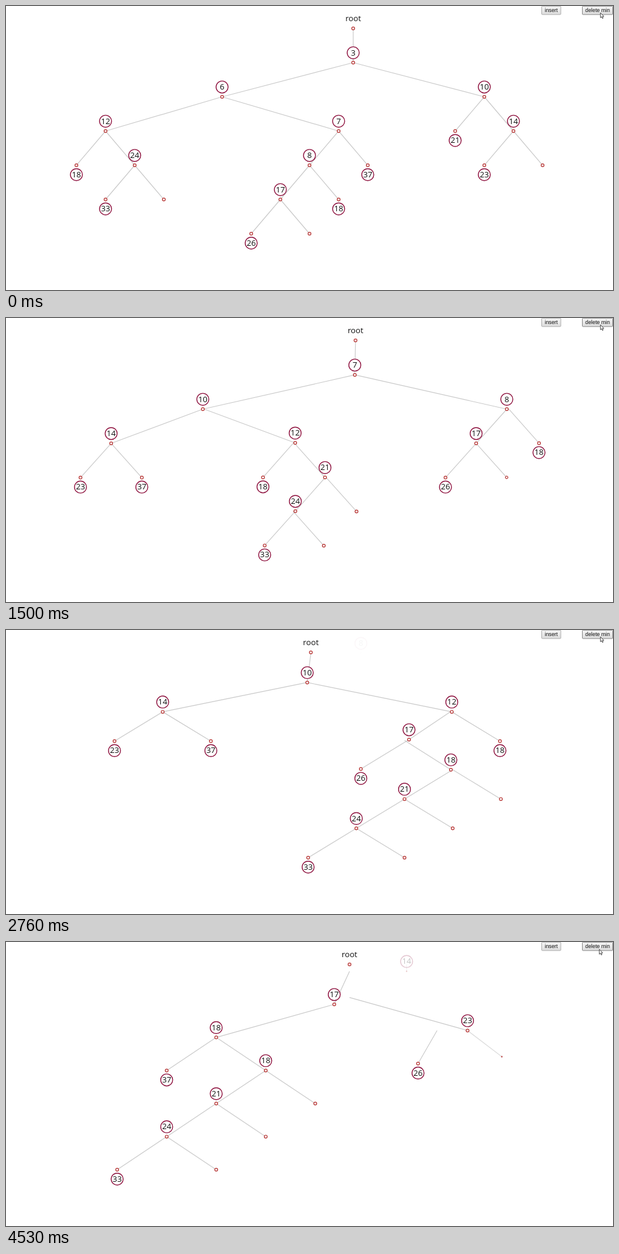
Recreate the animation shown at these times as an HTML page. Size 1000x469 px, loop 4.56 s.

```html
<!DOCTYPE html>
<html lang="en">
<head>
<meta charset="utf-8">
<title>Leftist heap</title>
<style>
  html, body { margin: 0; width: 100%; height: 100%; overflow: hidden; background: #fff; }
  svg { display: block; width: 100vw; height: 100vh; }
  .link { stroke: #cacaca; stroke-width: 1.2; }
  .dot { fill: #fff; stroke: #b5302f; stroke-width: 1.2; }
  .ring { fill: #fff; stroke: #8f1440; stroke-width: 1.4; }
  #tree text { font: 13.2px "Open Sans", "Noto Sans", sans-serif; fill: #111; text-anchor: middle; }
  .button text { font: 8.8px "Liberation Sans", Arial, sans-serif; fill: #111; text-anchor: middle; }
</style>
</head>
<body>
<svg viewBox="0 0 1000 469">
  <defs>
    <linearGradient id="face" x2="0" y2="1">
      <stop offset="0" stop-color="#f6f6f6"/>
      <stop offset="1" stop-color="#dcdcdc"/>
    </linearGradient>
  </defs>
  <g id="tree"></g>
  <g class="button">
    <rect x="882.5" y="0.3" width="31.5" height="13.8" rx="1" fill="url(#face)" stroke="#ababab"/>
    <text x="898.2" y="10.3">insert</text>
  </g>
  <g class="button">
    <rect id="press" x="949.5" y="0.3" width="50" height="13.8" rx="1" fill="url(#face)" stroke="#858585"/>
    <text x="974.6" y="10.3">delete min</text>
  </g>
  <path id="cursor" d="M0 0V8.2L1.9 6.5L3.2 9.4L4.5 8.8L3.2 6H5.7Z" fill="#fff" stroke="#222" stroke-width="0.8"/>
</svg>
<script>
const LOOP = 4560, MOVE = 670, FIRST_MOVE = 840, PRESS = 60;
const CLICKS = [30, 897, 1565, 2230, 2882, 3537, 4220];
const el = id => document.getElementById(id);

// Leftist heap
const heap = (key, l = null, r = null) => ({ key, l, r });
const rank = h => h ? 1 + Math.min(rank(h.l), rank(h.r)) : 0;

function merge(a, b) {
  if (!a || !b) return a || b;
  if (b.key <= a.key) [a, b] = [b, a];
  const l = a.l, r = merge(a.r, b);
  return rank(l) < rank(r) ? heap(a.key, r, l) : heap(a.key, l, r);
}

const initial = heap(3,
  heap(6,
    heap(12, heap(18), heap(24, heap(33))),
    heap(7, heap(8, heap(17, heap(26)), heap(18)), heap(37))),
  heap(10, heap(21), heap(14, heap(23))));

// Tidy tree layout: siblings one unit apart, cousins two
function toNode(h) {
  const kids = h && (h.l || h.r) ? [toNode(h.l), toNode(h.r)] : [];
  return { label: h ? String(h.key) : '', kids, dx: 0 };
}

function contour(node) {
  const sides = node.kids.map(contour);
  if (sides.length < 2) return [[0, 0], ...(sides[0] || [])];
  const [a, b] = sides;
  let gap = 0;
  for (let i = 0; i < Math.min(a.length, b.length); i++) {
    gap = Math.max(gap, a[i][1] - b[i][0] + (i ? 2 : 1));
  }
  const h = gap / 2;
  node.kids[0].dx = -h;
  node.kids[1].dx = h;
  const rows = [[0, 0]];
  for (let i = 0; i < Math.max(a.length, b.length); i++) {
    const left = a[i] ? a[i][0] - h : b[i][0] + h;
    const right = b[i] ? b[i][1] + h : a[i][1] - h;
    rows.push([left, right]);
  }
  return rows;
}

// Equal labels are told apart by their order of appearance
function layout(h) {
  const root = { label: 'root', kids: [toNode(h)], dx: 0 };
  const rows = contour(root);
  const min = Math.min(...rows.map(r => r[0]));
  const max = Math.max(...rows.map(r => r[1]));
  const seen = {}, nodes = new Map();
  (function visit(n, x, depth, parent) {
    seen[n.label] = (seen[n.label] || 0) + 1;
    const id = n.label + '#' + seen[n.label];
    nodes.set(id, {
      label: n.label, parent, leaf: !n.kids.length,
      x: 20 + 960 * (x - min + 1) / (max - min + 2),
      y: 37 + 339 * depth / (rows.length - 1)
    });
    n.kids.forEach(k => visit(k, x + k.dx, depth + 1, id));
  })(root, 0, 0, null);
  return nodes;
}

const states = [layout(initial)];
CLICKS.reduce(h => {
  const next = merge(h.l, h.r);
  states.push(layout(next));
  return next;
}, initial);

// cubic-bezier(.25, .1, .25, 1)
function ease(x) {
  let lo = 0, hi = 1;
  for (let i = 0; i < 24; i++) {
    const u = (lo + hi) / 2;
    if (0.75 * u * (1 - u) + u ** 3 < x) lo = u; else hi = u;
  }
  return 0.3 * lo * (1 - lo) ** 2 + 3 * lo * lo * (1 - lo) + lo ** 3;
}

const lerp = (a, b, k) => ({ x: a.x + (b.x - a.x) * k, y: a.y + (b.y - a.y) * k });
const num = v => v.toFixed(2);

function linkMarkup(s, p, alpha) {
  return `<line class="link" x1="${num(s.x)}" y1="${num(s.y)}" x2="${num(p.x)}" y2="${num(p.y)}" opacity="${num(alpha)}"/>`;
}

function nodeMarkup(n, p, alpha, size) {
  let out = `<g transform="translate(${num(p.x)} ${num(p.y)})" opacity="${num(alpha)}">` +
    `<circle class="dot" r="${num(2.4 * size)}"/>`;
  if (n.label) {
    const y = n.leaf ? 15.6 : -16.2;
    if (n.label !== 'root') out += `<circle class="ring" cy="${y}" r="9.9"/>`;
    out += `<text y="${num(y + 4.2)}">${n.label}</text>`;
  }
  return out + '</g>';
}

function drawTree(from, to, x) {
  const k = x >= 1 ? 1 : x <= 0 ? 0 : ease(x);
  let links = '', nodes = '';
  for (const id of new Set([...from.keys(), ...to.keys()])) {
    const a = from.get(id), b = to.get(id);
    const home = from.get((a && b ? a : a || b).parent);
    const start = a || home, end = b || home;
    const p = lerp(start, end, k);
    const alpha = a && b ? 1 : a ? 1 - k : k;
    const size = a && b ? 1 : a ? 1 - k : x ** 1.5;
    if (alpha < 0.005) continue;
    if (home) links += linkMarkup(b ? lerp(home, to.get(b.parent), k) : home, p, alpha);
    nodes += nodeMarkup(b || a, p, alpha, size);
  }
  el('tree').innerHTML = links + nodes;
}

function draw(t) {
  const step = Math.max(0, CLICKS.filter(c => c <= t).length - 1);
  const x = (t - CLICKS[step]) / (step ? MOVE : FIRST_MOVE);
  drawTree(states[step], states[step + 1], Math.min(1, Math.max(0, x)));
  const pressed = CLICKS.some((c, i) => i && t >= c - PRESS && t < c);
  el('press').setAttribute('fill', pressed ? '#e2e2e2' : 'url(#face)');
  el('cursor').setAttribute('transform', t < 3400 ? 'translate(979.3 11.2)' : 'translate(977.4 12)');
}

const began = performance.now();
(function tick() {
  draw((performance.now() - began) % LOOP);
  requestAnimationFrame(tick);
})();
</script>
</body>
</html>
```
